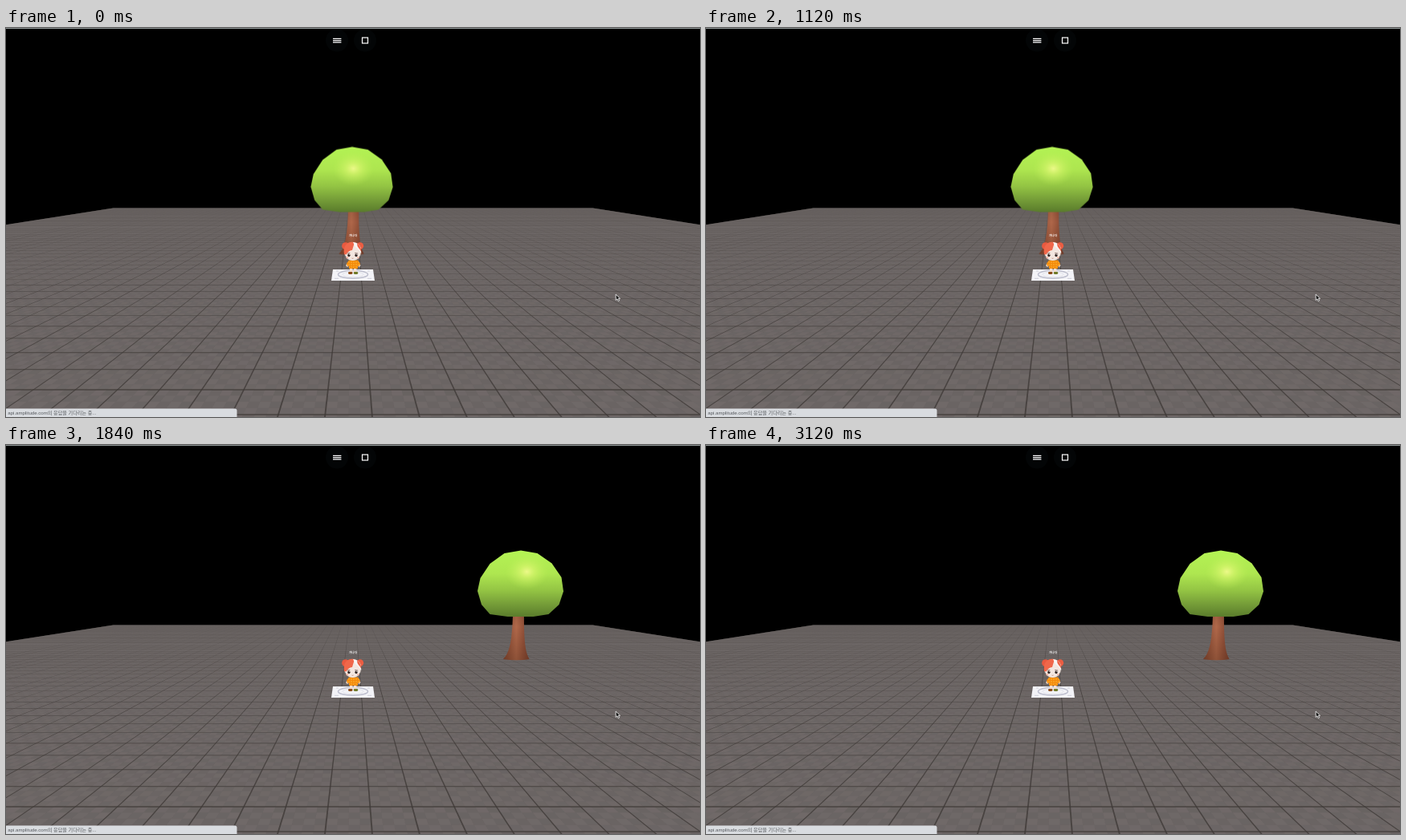
Recreate the animation shown at these times as an HTML page with a canvas. Size 864 by 485 pixels, loop 3.2 s.

```html
<!DOCTYPE html>
<html lang="ko">
<head>
<meta charset="utf-8">
<style>
  html, body { margin: 0; width: 100%; height: 100%; overflow: hidden; background: #000; }
  canvas, svg { position: absolute; left: 0; top: 0; width: 864px; height: 485px; }
  text { font-family: "Liberation Sans", "Noto Sans CJK KR", "Noto Sans CJK", sans-serif; }
  #near { animation: hide 3200ms step-end infinite; }
  #away { animation: show 3200ms step-end infinite; }
  @keyframes hide { 0% { opacity: 1 } 47.5%, 100% { opacity: 0 } }
  @keyframes show { 0% { opacity: 0 } 47.5%, 100% { opacity: 1 } }
</style>
</head>
<body>
<canvas id="floor" width="864" height="485"></canvas>
<svg viewBox="0 0 864 485">
  <defs>
    <linearGradient id="leaf" x1="0" y1="0" x2="0" y2="1">
      <stop offset="0" stop-color="#b4f354"/>
      <stop offset=".35" stop-color="#aee650"/>
      <stop offset=".6" stop-color="#94c544"/>
      <stop offset=".8" stop-color="#779f39"/>
      <stop offset="1" stop-color="#5a7c2c"/>
    </linearGradient>
    <radialGradient id="shine">
      <stop offset="0" stop-color="#f0fa8c" stop-opacity=".95"/>
      <stop offset=".35" stop-color="#dcf870" stop-opacity=".6"/>
      <stop offset="1" stop-color="#bff058" stop-opacity="0"/>
    </radialGradient>
    <linearGradient id="bark">
      <stop offset="0" stop-color="#81442f"/>
      <stop offset=".5" stop-color="#b0684a"/>
      <stop offset="1" stop-color="#7d402d"/>
    </linearGradient>
    <linearGradient id="shade" x1="0" y1="0" x2="0" y2="1">
      <stop offset="0" stop-color="#40200f" stop-opacity=".15"/>
      <stop offset=".3" stop-color="#40200f" stop-opacity="0"/>
      <stop offset="1" stop-color="#40200f" stop-opacity=".3"/>
    </linearGradient>
    <pattern id="knit" width="3" height="3" patternUnits="userSpaceOnUse">
      <rect width="3" height="3" fill="#f58a0c"/>
      <circle cx="1" cy="1" r=".7" fill="#ffc43c"/>
    </pattern>
  </defs>

  <rect width="864" height="1" fill="#8f9796"/>

  <g id="near"></g>
  <g id="away"></g>

  <!-- spawn plate -->
  <path d="M407 301H457L459 315H405Z" fill="#f3f3f7"/>
  <g fill="none" stroke="#bfc0cf">
    <ellipse cx="432" cy="307.3" rx="18.5" ry="5" stroke-width="1.6"/>
    <ellipse cx="432" cy="307.3" rx="13" ry="3.4" stroke-width=".6" stroke="#d9dae4"/>
    <path d="M409 312.3h5M450 312.3h5M411 303h3M450 303h3" stroke-width=".7"/>
    <path d="M430.5 311.5l1.5 1.5 1.5-1.5" stroke-width=".8"/>
  </g>

  <!-- avatar -->
  <g>
    <path d="M428 299h3.4v7H428zM433 299h3.4v7H433z" fill="#f4dfcf"/>
    <rect x="426" y="304" width="5.5" height="3" rx="1.4" fill="#8a4a18"/>
    <rect x="432.8" y="304" width="5.5" height="3" rx="1.4" fill="#6f7a28"/>
    <circle cx="425" cy="296" r="1.7" fill="#f7e2d2"/>
    <circle cx="439.7" cy="296" r="1.7" fill="#f7e2d2"/>
    <path d="M427 289.5h11l3 4-1 3.5-2-.5v3.5h-11v-3.5l-2 .5-1-3.5z" fill="url(#knit)"/>
    <circle cx="422.7" cy="271.8" r="4.6" fill="#e9593f"/>
    <circle cx="440.8" cy="271.6" r="4.4" fill="#ea5d42"/>
    <ellipse cx="431.6" cy="279" rx="10.4" ry="11" fill="#f3e6df"/>
    <path d="M421 282C419.5 272 424 267 431 266.800L434 267 431 277Q426 277.500 423.500 282.500Z" fill="#f0674a"/>
    <path d="M432 266.900Q438.500 266.800 441.500 273.500L442.300 281 440 278Q438 274 435 273Z" fill="#f8f6f4"/>
    <path d="M437 268.600Q442 271 442.300 279L440.400 276Q438.500 274 437.500 272Z" fill="#ec6348"/>
    <path d="M424.600 281l3.700-.4M434.200 280.600l3.900.5" stroke="#5d4039" stroke-width=".7"/>
    <ellipse cx="426.900" cy="283.300" rx="1.6" ry="1.9" fill="#332624"/>
    <ellipse cx="436" cy="283.300" rx="1.6" ry="1.9" fill="#332624"/>
    <path d="M427.200 282.400h.7M436.300 282.400h.7" stroke="#fff" stroke-width=".8"/>
    <circle cx="424.800" cy="286.200" r="1.3" fill="#f3b9a8"/>
    <circle cx="438.400" cy="286.200" r="1.3" fill="#f3b9a8"/>
    <path d="M430.500 287q1 .7 2 0" fill="none" stroke="#9a5a4a" stroke-width=".6"/>
  </g>
  <text x="432" y="260.2" font-size="3.6" font-weight="700" fill="#fff" text-anchor="middle">가나다</text>

  <!-- top buttons -->
  <g fill="#030506">
    <circle cx="412" cy="15.5" r="14"/>
    <circle cx="447" cy="15.5" r="14"/>
  </g>
  <path d="M407 13.4h10.400M407 15.600h10.400M407 17.800h10.400" stroke="#fff" stroke-width="1.3"/>
  <rect x="443.500" y="12" width="7" height="7" fill="none" stroke="#fff" stroke-width="1.2"/>

  <path d="M759.200 332v7.300l1.800-1.500 1.300 2.800 1.300-.6-1.300-2.700h2.300z" fill="#111" stroke="#fff" stroke-width=".8"/>

  <!-- browser status -->
  <path d="M0 474.500H285Q287.500 474.500 287.500 477V485H0Z" fill="#d9dce0"/>
  <text x="2.3" y="482.2" font-size="6.1" fill="#55585c">api.amplitude.com의 응답을 기다리는 중...</text>
</svg>
<script>
const ctx = document.getElementById('floor').getContext('2d');
const CX = 432, HORIZON = 178;      // vanishing point
const COL = 0.192, COL0 = 0.078;    // column pitch and offset
const ROW = 0.000374, ROW0 = 0.003663;
const EDGE = 6.42, FAR = 224.5;

const rowY = n => HORIZON + 1 / (ROW0 + ROW * n);
const floorX = (u, y) => CX + u * (y - HORIZON);

function quad(u0, u1, y0, y1, color) {
  ctx.fillStyle = color;
  ctx.beginPath();
  ctx.moveTo(floorX(u0, y0), y0);
  ctx.lineTo(floorX(u1, y0), y0);
  ctx.lineTo(floorX(u1, y1), y1);
  ctx.lineTo(floorX(u0, y1), y1);
  ctx.fill();
}

let seed = 11;
const rand = () => (seed = (seed * 16807) % 2147483647) / 2147483647;
const SUB = 4;
const shades = Array.from({ length: SUB * SUB }, (_, i) =>
  ((i + (i >> 2)) % 2 ? 1 : -1) * (0.3 + 0.7 * rand()));

function drawFloor() {
  quad(-EDGE, EDGE, FAR, 490, '#6d6766');

  // paving texture, fading with distance
  for (let r = -2; r < 24; r++) {
    const fade = 1 - (r + 2) / 26;
    for (let j = 0; j < SUB; j++) {
      const y0 = rowY(r + (j + 1) / SUB), y1 = rowY(r + j / SUB);
      for (let c = -33; c < 33; c++) {
        for (let i = 0; i < SUB; i++) {
          const u0 = COL0 + COL * (c + i / SUB), u1 = u0 + COL / SUB;
          if (floorX(u1, y1) < 0 || floorX(u0, y1) > 864) continue;
          const s = shades[j * SUB + i];
          const tint = s > 0 ? '130,118,116' : '84,82,80';
          quad(u0, u1, y0, y1, `rgba(${tint},${0.2 * Math.abs(s) * fade})`);
        }
      }
    }
  }

  // joints
  const joint = 'rgba(62,57,54,.78)';
  for (let c = -33; c <= 32; c++) {
    const u = COL0 + COL * c;
    quad(u - 0.0032, u + 0.0032, FAR, 490, joint);
  }
  for (let r = -1; r < 47; r++) {
    const y = rowY(r), h = Math.max(0.12, (y - HORIZON) ** 2 * 0.0000085);
    quad(-EDGE, EDGE, y - h, y + h, joint);
  }

  const haze = ctx.createLinearGradient(0, FAR, 0, 300);
  haze.addColorStop(0, 'rgba(104,98,97,.55)');
  haze.addColorStop(1, 'rgba(104,98,97,0)');
  quad(-EDGE, EDGE, FAR, 300, haze);
}

const TRUNK = 'M-9.5 36H4.5Q4 66 6.5 81Q8 89 11 94Q-5 96.5-21.5 94Q-16 88-14 80Q-10 66-9.5 36Z';
const CROWN = 'M.5-41.5L21-38 39-25.5 51-8 53.5 9.5 48 26 35 38 16 41H-16L-38 38-48.500 26-53.500 9-50-7-38-25-20-38Z';

// crown centre, crown scale, trunk shift and highlight position
function tree(id, x, y, sx, sy, lean, shineX, shineY) {
  document.getElementById(id).innerHTML = `
    <g transform="translate(${x} ${y}) scale(${sx} ${sy})">
      <g transform="translate(${lean} 0)">
        <path d="${TRUNK}" fill="url(#bark)"/>
        <path d="${TRUNK}" fill="url(#shade)"/>
      </g>
      <path d="${CROWN}" fill="url(#leaf)"/>
      <ellipse cx="${shineX}" cy="${shineY}" rx="27" ry="22" fill="url(#shine)"/>
    </g>`;
}

drawFloor();
tree('near', 430.5, 189, 0.955, 0.985, 4.7, 2, -14);
tree('away', 640.5, 173, 1, 1, 0, 8, -15);
</script>
</body>
</html>
```
